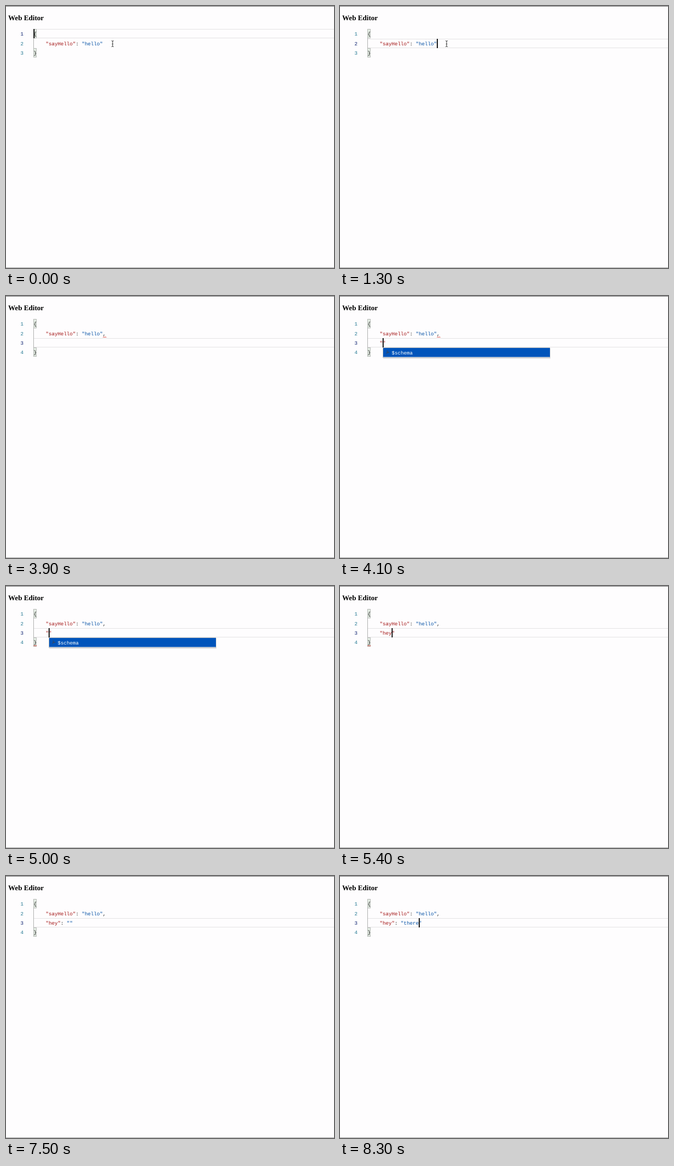
An HTML page for the animation above (8.5 s loop, 600 by 479 pixels).

```html
<!DOCTYPE html>
<html lang="en">
<head>
<meta charset="utf-8">
<title>Web Editor</title>
<style>
  html, body { margin: 0; width: 100%; height: 100%; overflow: hidden; background: #fefdfe; }
  svg { display: block; width: 600px; height: 479px; }
  text { white-space: pre; text-rendering: geometricPrecision; }
  .code { font: 9.18px "Liberation Mono", "Courier New", monospace; fill: #111; }
  .title { font: bold 13.1px "Liberation Serif", "Times New Roman", serif; fill: #000; }
  .key { fill: #a31515; }
  .val { fill: #0451a5; }
  .num { fill: #237893; }
  .num.on { fill: #0b216f; }
  .line { fill: none; stroke: #e4e3e4; }
  .match { fill: #e6efe6; stroke: #b5b8b5; }
  .wave { fill: none; stroke: #d8382c; stroke-width: 1; }
</style>
</head>
<body>
<svg viewBox="0 0 600 479">
  <rect width="600" height="479" fill="#fefdfe"/>
  <rect width="600" height="1" fill="#737273"/>
  <rect y="478" width="600" height="1" fill="#a3a2a3"/>
  <text class="title" x="4" y="26">Web Editor</text>

  <path id="current" class="line"/>
  <path id="guide" stroke="#b0b0b0"/>
  <rect class="match" x="50.5" y="42.5" width="5" height="16"/>
  <rect id="endMatch" class="match" x="50.5" width="5" height="16"/>

  <g id="nums" class="code"></g>
  <g id="rows" class="code"></g>

  <path id="commaWave" class="wave" d="M177.5 76l1.5-1.5 1.5 1.5 1.5-1.5 1.5 1.5"/>
  <path id="endWave" class="wave" d="M50.5 110l1.4-1.5 1.4 1.5 1.4-1.5 1.4 1.5"/>
  <rect id="caret" width="1.8" height="17" fill="#000"/>

  <g id="popup">
    <rect x="1" y="1" width="306" height="19.5" fill="#dddcdd"/>
    <rect x=".5" y=".5" width="305" height="18" fill="#f3f3f3" stroke="#c8c8c8"/>
    <rect x="1" y="1" width="305" height="16.5" fill="#0054bb"/>
    <path d="M6.5 11.5l3.5-3.5M9.5 5.5a2 2 0 1 0 2.5 2.5" fill="none" stroke="#30486c" stroke-width="1.2"/>
    <text class="code" x="16.4" y="12.6" style="fill:#fff">$schema</text>
  </g>

  <path id="mouse" d="M193 63.5q2 0 2 1.5q0-1.5 2-1.5M195 65v8M193 74.5q2 0 2-1.5q0 1.5 2 1.5M193.8 69.5h2.4"
        fill="none" stroke="#3a3a3a"/>
</svg>
<script>
const LOOP = 8500, LEFT = 50.4, CHAR = 5.51, TOP = 42.4, ROW = 17.2;
const $ = id => document.getElementById(id);
const rowTop = r => TOP + ROW * r;
const colX = c => LEFT + CHAR * c;

// Each step changes part of the editor state and keeps the rest.
const steps = [
  [0, { row: 0, col: 0, caret: 1, mouse: 1, comma: '', extra: null, popup: null, commaWave: 0, endWave: 0 }],
  [200, { row: 1, col: 23 }],
  [800, { caret: 0 }],
  [1300, { caret: 1 }],
  [1400, { comma: ',', col: 24 }],
  [1500, { mouse: 0 }],
  [1900, { caret: 0 }],
  [2000, { commaWave: 1 }],
  [2500, { caret: 1 }],
  [2900, { row: 2, col: 4, extra: ['', ''] }],
  [3500, { caret: 0 }],
  [4000, { caret: 1, col: 5, extra: ['""', ''] }],
  [4100, { popup: 5 }],
  [4500, { caret: 0, commaWave: 0, endWave: 1 }],
  [5000, { caret: 1 }],
  [5200, { extra: ['"h"', ''], col: 6, popup: 6 }],
  [5300, { extra: ['"he"', ''], col: 7, popup: 7 }],
  [5400, { extra: ['"hey"', ''], col: 8, popup: null }],
  [5900, { caret: 0 }],
  [6000, { caret: 1, col: 9 }],
  [6500, { extra: ['"hey"', ':'], col: 10 }],
  [6800, { extra: ['"hey"', ': '], col: 11 }],
  [7000, { extra: ['"hey"', ': ', '""'], col: 12 }],
  [7500, { caret: 0, endWave: 0 }],
  ...[7800, 7900, 8100, 8200, 8300].map((t, i) =>
    [t, { caret: 1, col: 13 + i, extra: ['"hey"', ': ', `"${'there'.slice(0, i + 1)}"`] }])
];

const stateAt = t => Object.assign({}, ...steps.filter(s => s[0] <= t).map(s => s[1]));
const span = (cls, s) => `<tspan class="${cls}">${s}</tspan>`;
const pair = (key, sep, val = '', end = '') => span('key', key) + sep + span('val', val) + end;
const show = (id, on) => $(id).setAttribute('visibility', on ? 'visible' : 'hidden');
const textAt = (x, r, s, cls = '') =>
  `<text class="${cls}" x="${x}" y="${rowTop(r) + 12}">${s}</text>`;

function draw(s) {
  const rows = [[0, '{'], [4, pair('"sayHello"', ': ', '"hello"', s.comma)]];
  if (s.extra) rows.push([4, pair(...s.extra)]);
  rows.push([0, '}']);
  const last = rows.length - 1;

  $('rows').innerHTML = rows.map(([c, str], r) => textAt(colX(c), r, str)).join('');
  $('nums').innerHTML = rows.map((_, r) =>
    textAt(26.4, r, r + 1, r === s.row ? 'num on' : 'num')).join('');

  const y = Math.round(rowTop(s.row));
  $('current').setAttribute('d', `M601 ${y + .5}H51M51 ${y + 16.5}H601`);
  $('guide').setAttribute('d', `M50.5 59V${Math.round(rowTop(last))}`);
  $('endMatch').setAttribute('y', Math.round(rowTop(last)) + .5);
  $('caret').setAttribute('x', colX(s.col));
  $('caret').setAttribute('y', y);
  if (s.popup) $('popup').setAttribute('transform', `translate(${Math.round(colX(s.popup))} 94)`);
  for (const id of ['caret', 'mouse', 'commaWave', 'endWave', 'popup']) show(id, s[id]);
}

let drawn = -1;
function frame() {
  const t = performance.now() % LOOP;
  const n = steps.filter(s => s[0] <= t).length;
  if (n !== drawn) draw(stateAt(t));
  drawn = n;
  requestAnimationFrame(frame);
}
frame();
</script>
</body>
</html>
```
